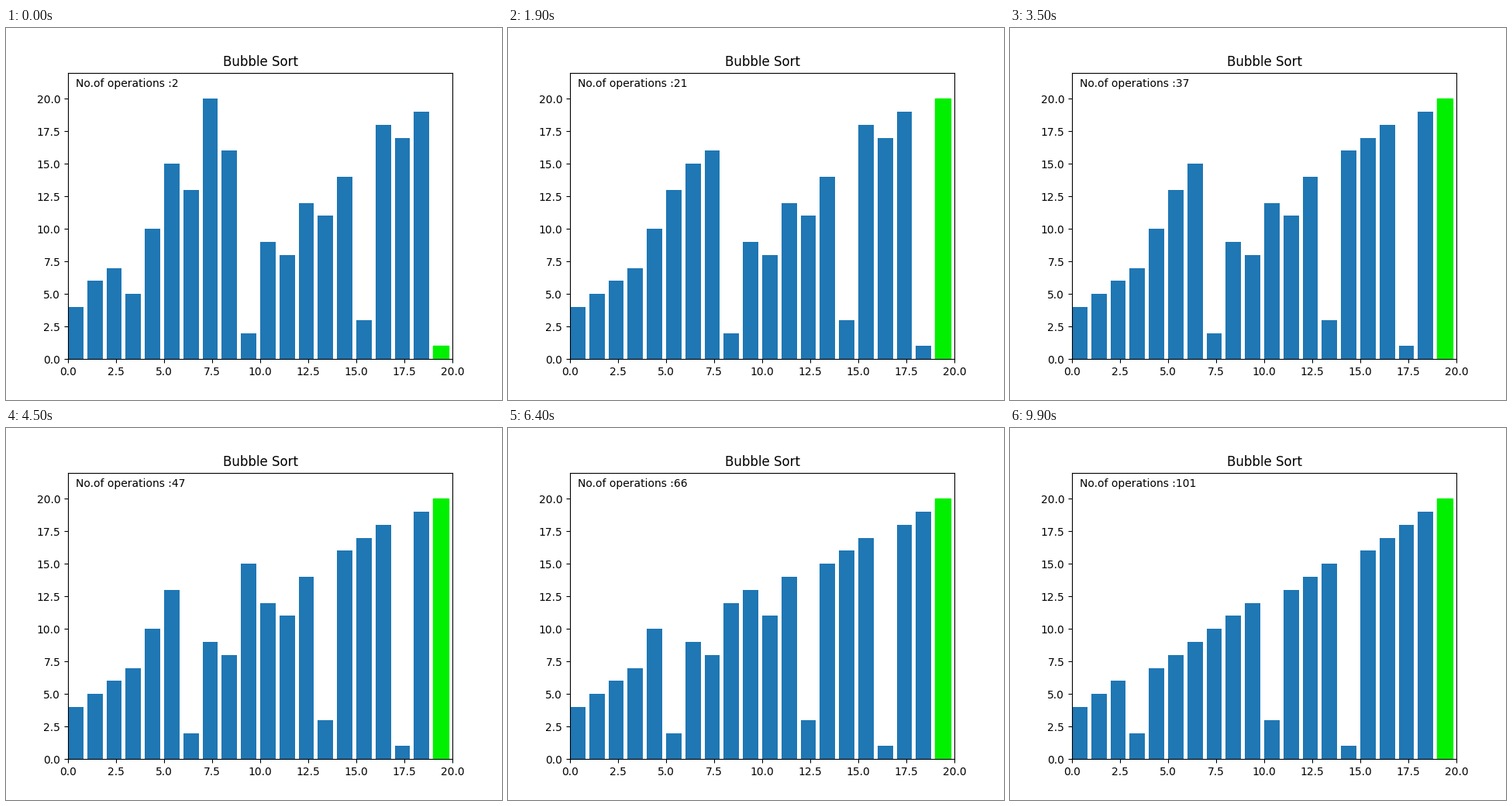
Recreate the animation shown at these times as a matplotlib script. Size 640 px wide and 480 px high, loop 10 s.

```python
import matplotlib.pyplot as plt
from matplotlib.animation import FuncAnimation

START = [4, 6, 7, 5, 10, 15, 13, 20, 16, 2,
         9, 8, 12, 11, 14, 3, 18, 17, 19, 1]
N = len(START)
FRAMES = 100
FIRST_OP = 2


def sort_states():
    """Values after each comparison; every pass runs the full length."""
    vals = START[:]
    states = [vals[:]]
    for op in range(FIRST_OP, FIRST_OP + FRAMES - 1):
        j = op % (N - 1)
        if vals[j] > vals[j + 1]:
            vals[j], vals[j + 1] = vals[j + 1], vals[j]
        states.append(vals[:])
    return states


states = sort_states()

plt.rcParams["font.family"] = "DejaVu Sans"
fig, ax = plt.subplots(figsize=(6.4, 4.8), dpi=100)
ax.set_title("Bubble Sort")
bars = ax.bar(range(N), START, align="edge")
bars[-1].set_color("#00f000")
ax.set_xlim(0, N)
ax.set_ylim(0, int(N * 1.1))
label = ax.text(0.02, 0.95, "", transform=ax.transAxes)


def update(i):
    for bar, val in zip(bars, states[i]):
        bar.set_height(val)
    label.set_text(f"No.of operations :{i + FIRST_OP}")
    return [*bars, label]


anim = FuncAnimation(fig, update, frames=FRAMES, interval=100,
                     repeat=True, repeat_delay=0, blit=False)
plt.show()
```
